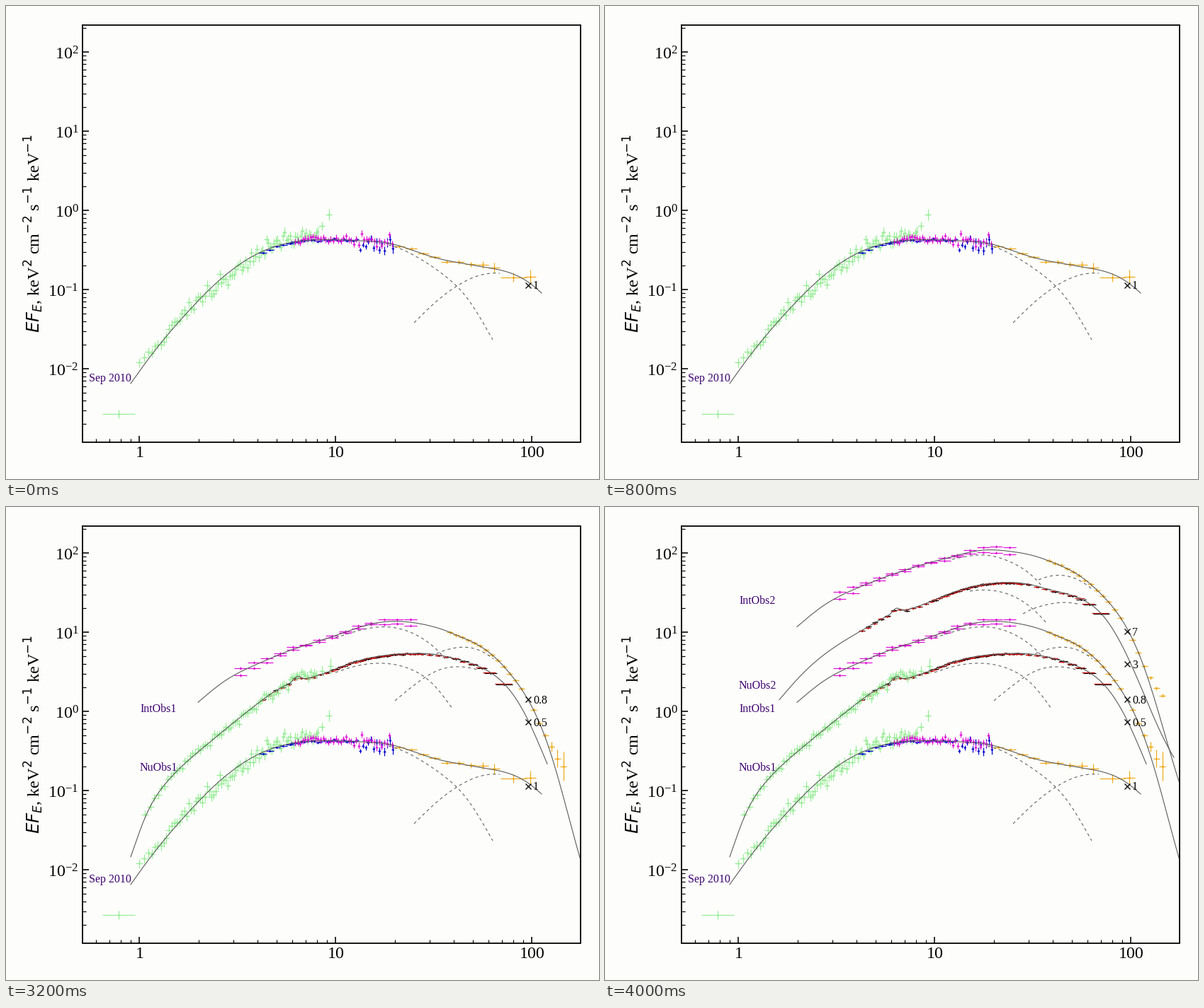
Animation, 837 px wide and 669 px high, one loop 8000 ms. Source, as a matplotlib script:

```python
import numpy as np
import matplotlib.pyplot as plt
from matplotlib.animation import FuncAnimation

W, H, DPI = 837, 669, 72
STEP, LOOP = 50, 8000
LEFT, RIGHT, TOP, BOTTOM = 108.5, 811.5, 27, 617
DECADE_X, DECADE_Y = 277, 112
GREEN, MAGENTA, BLUE, ORANGE = "#96ec96", "#e010d8", "#0000d0", "#f0a818"
RED, BLACK, GREY, INDIGO = "#cc1010", "#000000", "#5a5a5a", "#3c0070"

plt.rcParams["font.family"] = "Liberation Serif"
rng = np.random.default_rng(10)

fig = plt.figure(figsize=(W / DPI, H / DPI), dpi=DPI, facecolor="#fdfefb")
ax = fig.add_axes([0, 0, 1, 1])
ax.set(xlim=(0, W), ylim=(H, 0))
ax.axis("off")


def px(energy):
    return 188.5 + DECADE_X * np.log10(energy)


def py(flux):
    return 289 - DECADE_Y * np.log10(flux)


def spline(knots):
    """Natural cubic spline through (x, y) knots, straight beyond its ends."""
    x, y = np.array(knots, float).T
    h, n = np.diff(x), len(x)
    a, b = np.eye(n), np.zeros(n)
    for i in range(1, n - 1):
        a[i, i - 1:i + 2] = h[i - 1], 2 * (h[i - 1] + h[i]), h[i]
        b[i] = 6 * ((y[i + 1] - y[i]) / h[i] - (y[i] - y[i - 1]) / h[i - 1])
    m = np.linalg.solve(a, b)

    def inside(q):
        i = np.clip(np.searchsorted(x, q) - 1, 0, n - 2)
        u, v, d = x[i + 1] - q, q - x[i], h[i]
        return ((m[i] * u ** 3 + m[i + 1] * v ** 3) / (6 * d)
                + (y[i] / d - m[i] * d / 6) * u + (y[i + 1] / d - m[i + 1] * d / 6) * v)

    def curve(q):
        c = np.clip(q, x[0], x[-1])
        lo = inside(x[0] + 1) - y[0]
        hi = y[-1] - inside(x[-1] - 1)
        return inside(c) + np.where(q < c, lo, hi) * (q - c)

    return curve


class Observation:
    """Two spectral components (dashed), their summed flux (solid) and data."""

    def __init__(self, start, name, name_at, scale, scale_y, soft, hard, dashes, bump=0):
        self.start, self.artists, self.bump = start, [], bump
        self.soft, self.hard = spline(soft), spline(hard)
        self.line(self.model, soft[0][0], hard[-1][0], lw=1.1)
        for part, ends in zip((self.soft, self.hard), dashes):
            self.line(part, *ends, lw=1.05, ls=(0, (4, 4)))
        x, y = name_at
        self.artists += [
            ax.text(x, y, name, size=16, color=INDIGO, zorder=6),
            ax.text(744, scale_y + 5.5, scale, size=16, zorder=6),
        ]
        self.artists += ax.plot(737.5, scale_y, "x", color=BLACK, ms=8.5, mew=1.3, zorder=6)

    def model(self, x):
        flux = sum(10 ** (-part(x) / DECADE_Y) for part in (self.soft, self.hard))
        return -DECADE_Y * np.log10(flux) - self.bump * np.exp(-((x - 411) / 7) ** 2)

    def line(self, curve, x0, x1, **style):
        x = np.arange(x0, x1 + 1)
        self.artists += ax.plot(x, curve(x), color=GREY, zorder=5, **style)

    def data(self, x, y, dx, dy, color, ms=2.8, lw=1.2):
        x, y, dx, dy = np.broadcast_arrays(np.asarray(x, float), y, dx, dy)
        self.artists += [
            ax.hlines(y, x - dx, x + dx, color=color, lw=lw, zorder=3),
            ax.vlines(x, y - dy, y + dy, color=color, lw=lw, zorder=3),
        ]
        self.artists += ax.plot(x, y, "o", color=color, ms=ms, mew=0, zorder=3)

    def scatter(self, x, noise, dx, dy, color, shift=0, **style):
        y = self.model(x) + shift + rng.normal(0, noise, len(x))
        self.data(x, y, dx, dy, color, **style)

    def show(self, t):
        for a in self.artists:
            a.set_visible(t >= self.start)


def draw_frame():
    ax.plot([LEFT, RIGHT, RIGHT, LEFT, LEFT], [TOP, TOP, BOTTOM, BOTTOM, TOP],
            color=BLACK, lw=1.8, solid_joinstyle="miter", zorder=8)
    for digits, size, lw in (([1], 9, 1.6), (range(2, 10), 5, 1.2)):
        xs = px(np.array([d * 10.0 ** k for k in range(-1, 3) for d in digits]))
        ys = py(np.array([d * 10.0 ** k for k in range(-3, 3) for d in digits]))
        xs = xs[(xs > LEFT) & (xs < RIGHT)]
        ys = ys[(ys > TOP) & (ys < BOTTOM)]
        ax.vlines(xs, BOTTOM - size, BOTTOM, color=BLACK, lw=lw, zorder=7)
        ax.hlines(ys, LEFT, LEFT + size, color=BLACK, lw=lw, zorder=7)
    for e in (1, 10, 100):
        ax.text(px(e), 638.5, str(e), size=24, ha="center")
    for k in range(-2, 3):
        ax.text(102.5, py(10.0 ** k) + 11, rf"$\mathdefault{{10^{{{k}}}}}$", size=24, ha="right")
    ax.text(48, 322, r"$EF_E$, keV$^2$ cm$^{-2}$ s$^{-1}$ keV$^{-1}$", size=24.2,
            rotation=90, rotation_mode="anchor", ha="center", va="baseline")


def sep_2010():
    ob = Observation(
        0, "Sep 2010", (117, 531), "1", 395,
        [(176, 534), (205, 494), (250, 440), (300, 389), (350, 353), (400, 335),
         (440, 331), (500, 333), (553, 342), (590, 361), (620, 382), (650, 412), (687, 472)],
        [(576, 448), (605, 420), (635, 397), (665, 382), (697, 378), (740, 394), (756, 407)],
        [(540, 687), (576, 697)])
    ob.data([159, 446, 456], [577, 311, 295], [23, 4.5, 4.5], [6, 6, 8], GREEN)
    x = 188 + 252 * np.linspace(0, 1, 85) ** 0.8
    ob.scatter(x, 7, np.linspace(5, 2.5, 85), 6.5, GREEN, shift=-5 * np.cos((x - 188) / 40))

    ob.scatter(np.arange(363, 402, 9.5), 0.5, 5.5, 1, BLUE, shift=1.5)
    ob.scatter(np.arange(403, 497, 4.6), 1.2, 3, 2, BLUE)
    ob.scatter(np.arange(500, 548, 3.8), 5, 1.5, np.linspace(3, 7, 13), BLUE, shift=3)
    x = np.arange(408, 546, 3.6)
    ob.scatter(x, np.linspace(2, 5, x.size), 2, 4.5, MAGENTA)

    x = 555 + 16.8 * np.arange(9)
    ob.scatter(x, 1, 8, 2 + 5 * ((x - 555) / 134) ** 4, ORANGE)
    ob.data([716, 740], [384, 383], [18, 8], [6, 10], ORANGE)
    return ob


def nustar(last, *model):
    ob = Observation(*model, bump=6.5)
    x = np.concatenate([np.arange(362, 460, 9), np.arange(460, 590, 5.5),
                        np.arange(597, 690, 12.2), [last]])
    dx = np.interp(x, [362, 600, 670, 700], [4, 4, 7, 12])
    for color, shift in ((BLACK, 1.5), (RED, 0)):
        ob.scatter(x + shift, 0.5, dx, 1, color, shift=0.6, ms=2.5)
    return ob


def nu_1():
    ob = nustar(
        702, 2800, "NuObs1", (189, 373), "0.5", 304,
        [(176, 503), (195, 446), (227, 391), (275, 345), (350, 284), (395, 254.5),
         (440, 242), (490, 226), (530, 221), (570, 229), (605, 253), (630, 285)],
        [(549, 274), (580, 249), (610, 231), (640, 226), (668, 231), (705, 255),
         (735, 301), (764, 369)],
        [(465, 630), (549, 668)])
    x = 196 + 242 * np.linspace(0, 1, 75) ** 0.8
    ob.scatter(x, 3.2, np.linspace(5, 3, 75), 5.5, GREEN, shift=-4 * (x > 400))
    ob.data([446, 458], [232, 225], 4, [7, 11], GREEN)
    return ob


def nu_2():
    return nustar(
        699, 3750, "NuObs2", (189, 257), "3", 222,
        [(246, 273), (280, 235), (325, 198), (375, 168), (395, 157), (440, 143),
         (490, 125), (540, 117.5), (580, 128), (612, 152), (623, 164)],
        [(540, 196), (590, 151), (620, 139), (650, 135), (680, 142), (700, 157),
         (728, 201), (765, 297), (803, 427)],
        [(515, 623), (590, 670)])


def integral(tail_error, *model):
    ob = Observation(*model)
    x = 331.5 + 18.4 * np.arange(14)
    split = 1 + 3.5 * np.linspace(-1, 1, 14) ** 2
    for side in (-1, 1):
        ob.scatter(x, 0.8, 9, 1.8, MAGENTA, shift=side * split)
    # the last points flatten out above the model
    x = 627 + 8.4 * np.delete(np.arange(20), 13)
    tail = np.maximum(x - 752, 0) ** 2
    ob.scatter(x, 0.5, 4.5, 2.5 + tail_error * tail, ORANGE, shift=-0.036 * tail)
    return ob


def int_1():
    return integral(
        0.015, 2950, "IntObs1", (189, 290), "0.8", 272,
        [(271, 277), (310, 246), (355, 223), (405, 203), (455, 188), (490, 177),
         (535, 169.5), (575, 179), (605, 199), (620, 215), (650, 264)],
        [(540, 255), (600, 211), (630, 200), (660, 200), (688, 215), (715, 243),
         (738, 277), (765, 340), (810, 514)],
        [(465, 620), (600, 688)])


def int_2():
    return integral(
        0, 3650, "IntObs2", (189, 137), "7", 176,
        [(271, 170), (310, 139), (355, 116), (405, 97), (455, 82), (490, 74),
         (535, 68), (575, 79), (615, 110), (650, 163)],
        [(540, 154), (612, 103), (642, 96.5), (675, 107), (700, 127), (738, 177),
         (765, 243), (810, 414)],
        [(490, 615), (612, 688)])


draw_frame()
observations = [sep_2010(), nu_1(), int_1(), int_2(), nu_2()]


def update(i):
    for ob in observations:
        ob.show(i * STEP)
    return []


anim = FuncAnimation(fig, update, frames=LOOP // STEP, interval=STEP,
                     repeat=True, repeat_delay=0, blit=False)
plt.show()
```
